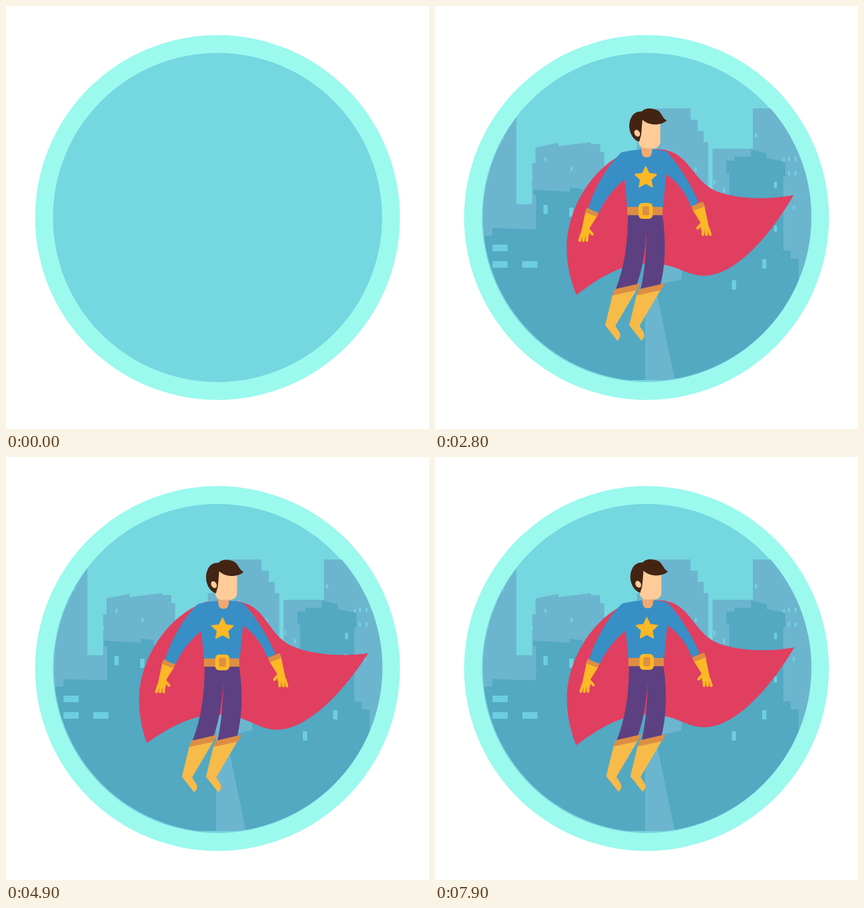
Animation of 640 by 640 pixels, one loop 8000 ms. Source, as an HTML page with a canvas:

```html
<!DOCTYPE html>
<html lang="en">
<head>
<meta charset="utf-8">
<title>Flying hero</title>
<style>
html, body { margin: 0; width: 100%; height: 100%; overflow: hidden; background: #fff; }
canvas { display: block; width: 640px; height: 640px; }
</style>
</head>
<body>
<canvas id="stage" width="640" height="640"></canvas>
<script>
const SIZE = 640, LOOP = 8000, STEP = 100;
const stage = document.getElementById('stage').getContext('2d');
const makeLayer = () => {
  const c = document.createElement('canvas');
  c.width = c.height = SIZE;
  return c.getContext('2d');
};
const heroLayer = makeLayer();

const C = {
  ring: '#9bf9ee', sky: '#75d7df', far: '#6cb5cf', near: '#53a8c2',
  farLight: '#75cfe3', nearLight: '#6ccfe0',
  cape: '#e03f60', suit: '#388fc6', legs: '#5d4082', gold: '#fdb825',
  trim: '#dd8e44', boot: '#f6bb49', skin: '#ffcc99', neck: '#f2a970', hair: '#432413'
};

const clamp = v => Math.min(1, Math.max(0, v));
const ramp = (t, from, to) => clamp((t - from) / (to - from));
const smooth = p => p * p * (3 - 2 * p);
const rad = deg => deg * Math.PI / 180;

function fill(g, color, d) {
  g.fillStyle = color;
  g.fill(new Path2D(d));
}
function disc(g, color, r) {
  g.fillStyle = color;
  g.beginPath();
  g.arc(320, 320, r, 0, 7);
  g.fill();
}
function box(g, color, x, y, w, h, r = 0) {
  g.fillStyle = color;
  g.beginPath();
  g.roundRect(x, y, w, h, r);
  g.fill();
}

function seeded(seed) {
  return () => (seed = seed * 16807 % 2147483647) / 2147483647;
}

// City
function cityLayer(outline, paint) {
  const g = makeLayer();
  g.beginPath();
  g.arc(321, 319, 248.5, 0, 7);
  g.clip();
  g.clip(outline);
  paint(g);
  return g.canvas;
}

const farShape = new Path2D('M60 100H123V300H147V238H152V214L187 207V212L236 206V209H250V221H256V290H287V305H420V216H481V155H580V566H60Z');
for (let i = 0; i < 4; i++) {
  const half = 54 - 6 * i - i * i;
  farShape.rect(359.5 - half, 206 - 17 * i, 2 * half, 128);
}
const nearShape = new Path2D('M60 349L87 347V336L153 338V286H148L149 278L204 281V275L224 277L223 284L258 288V296H254V350H318V566H60Z' +
  'M363 566L333 422L373 414V360L445 362V253H441V234H453V228H478V217L502 223V230L530 236V258H527V370H538V382H550V566Z');

const farCity = cityLayer(farShape, g => {
  box(g, C.far, 0, 0, SIZE, SIZE);
  const rand = seeded(11);
  for (let x = 78; x < 560; x += 21) box(g, C.farLight, x + 8 * rand(), 190 + 140 * rand(), 3, 6.5);
  for (const x of [534, 544]) for (const y of [228, 250]) box(g, C.farLight, x, y, 3, 6.5);
});

const nearCity = cityLayer(nearShape, g => {
  box(g, C.near, 0, 0, SIZE, SIZE);
  const pair = (x, y, dx, dy, w, h) => {
    for (let i = 0; i < 2; i++) box(g, C.nearLight, x + i * dx, y + i * dy, w, h);
  };
  pair(87, 361, 0, 25, 23, 10);
  pair(109, 386, 23, 0, 23 * 0, 10);
  box(g, C.nearLight, 132, 386, 23, 10);
  pair(164, 301, 39, 4, 6.5, 14);
  pair(486, 298, 26, 0, 4.5, 9);
  pair(513, 266, 0, 66, 4.5, 9.5);
  pair(457, 348, 18, 1, 5, 9);
  pair(387, 378, 18, 2, 7, 14);
  pair(495, 383, -46, 32, 6.5, 14);
});

function drawCity(t) {
  const p = ramp(t, 300, 1000);
  if (!p) return;
  stage.globalAlpha = p;
  stage.drawImage(farCity, 0, 0);
  stage.drawImage(nearCity, 0, 32 * (1 - p) ** 2);
  stage.globalAlpha = 1;
}

// Value at time t between turning points [time, value]
function track(t, ease, ...turns) {
  let value = turns[0][1];
  for (let i = 1; i < turns.length; i++) {
    const [t0, v0] = turns[i - 1], [t1, v1] = turns[i];
    if (t >= t0) value = v0 + (v1 - v0) * ease(ramp(t, t0, t1));
  }
  return value;
}
const driftX = t => track(t, p => p, [1500, 313.5], [5000, 328], [7900, 320.5]);
const bobY = t => track(t, smooth, [1300, 314], [2700, 310], [4100, 313.3], [6600, 302.3], [8600, 313]);
const capeAngle = t => track(t, smooth, [1800, 0], [4700, 3.7], [6500, 0.8], [8600, 1.8]);

// Hero, drawn with the belt centre at 315,312
function drawCape(g, angle) {
  g.save();
  g.translate(315, 222);
  g.rotate(rad(angle));
  g.translate(-315, -222);
  fill(g, C.cape, 'M214 441C250 412 285 391 325 391C365 391 378 408.500 406 408.500C450 408 500 355 540 284' +
    'C505 292 455 292 425 281C385 266 382 220 335 218L290 222C235 245 198 310 198 368C198 395 205 420 214 441Z');
  g.restore();
}

function drawLegs(g) {
  fill(g, C.legs, 'M288 317C288 360 283 397 269 432L301 425C310 400 314 375 316 343C316 375 313 405 307 432' +
    'L337 425C345 393 346 355 340 317Z');
  for (const x of [0, 36.5]) {
    g.save();
    g.translate(x, 0);
    fill(g, C.boot, 'M265 438L302 430L269 486L276 497Q278 504 272 508.500L253.500 485Z');
    fill(g, C.trim, 'M268 430.500L307.500 421.500L301.500 432L264.500 440Z');
    g.restore();
  }
}

function drawGlove(g) {
  fill(g, C.gold, 'M224 312L242 319L230 338L229 350H216L219 336Z');
  g.strokeStyle = C.gold;
  g.lineWidth = 4.2;
  g.lineCap = 'round';
  g.beginPath();
  for (let i = 0; i < 3; i++) {
    g.moveTo(218 + 4 * i, 347);
    g.lineTo(215 + 5.5 * i, 356.8);
  }
  g.moveTo(227, 339);
  g.lineTo(234, 347);
  g.stroke();
  fill(g, C.trim, 'M226 307L244 314L240.500 321L223 314Z');
}

function drawGloves(g) {
  drawGlove(g);
  g.save();
  g.translate(627.5, -9);
  g.scale(-1, 1);
  drawGlove(g);
  g.restore();
}

function drawTorso(g) {
  fill(g, C.suit, 'M278 223.500Q292 220 307 219H324Q336 219 346 222C364 240 384 273 395 299Q390 303 383 305' +
    'C376 285 363 268 346 256.500L341 307H287L283 264.500C268 276 252 296 244 315Q236 313 228 308' +
    'C238 276 257 243 278 223.500Z');
  box(g, C.trim, 287, 306, 53.5, 12.5);
  box(g, C.gold, 304, 300, 21.5, 24, 6);
  box(g, C.trim, 310, 305, 10, 13.5, 2);
}

function drawHead(g) {
  fill(g, C.neck, 'M308.500 205H324.500V222Q324 231 316.500 231Q309 231 308.500 222Z');
  box(g, C.skin, 304, 168, 33, 49.5, [0, 3, 10, 10]);
  fill(g, C.hair, 'M347 175C339 183 320 184 310 174L308 197L305 207.500C292 203 287 185 292 173C295 165 301 161 309 161.500' +
    'C313 156 325 155 334 160.500C339 164 341 173 347 175Z');
  g.fillStyle = C.skin;
  g.beginPath();
  g.ellipse(302, 194.5, 4, 5.5, -0.5, 0, 7);
  g.fill();
}

function drawStar(g, size) {
  if (!size) return;
  g.save();
  g.translate(315, 262);
  g.scale(size, size);
  g.beginPath();
  for (let i = 0; i < 10; i++) {
    const r = i % 2 ? 8.3 : 17, a = rad(i * 36 - 90);
    g.lineTo(r * Math.cos(a), r * Math.sin(a));
  }
  g.closePath();
  g.fillStyle = g.strokeStyle = C.gold;
  g.lineWidth = 1.6;
  g.lineJoin = 'round';
  g.fill();
  g.stroke();
  g.restore();
}

function drawHero(t) {
  const p = ramp(t, 450, 1490);
  if (!p) return;
  const e = smooth(p), rest = 1 - e, g = heroLayer;
  g.clearRect(0, 0, SIZE, SIZE);
  g.save();
  g.translate(driftX(t) - 18 * rest, bobY(t) + 145 * rest);
  g.rotate(rad(38 * rest));
  g.scale(e, e);
  g.translate(-315, -312);
  drawCape(g, capeAngle(t) + 10 * rest);
  drawLegs(g);
  drawGloves(g);
  drawTorso(g);
  drawHead(g);
  drawStar(g, smooth(ramp(t, 2100, 2600)));
  g.restore();
  stage.globalAlpha = p;
  stage.drawImage(g.canvas, 0, 0);
  stage.globalAlpha = 1;
}

function draw(now) {
  const t = Math.floor(now % LOOP / STEP) * STEP;
  stage.fillStyle = '#fff';
  stage.fillRect(0, 0, SIZE, SIZE);
  disc(stage, C.ring, 276);
  disc(stage, C.sky, 249);
  drawCity(t);
  drawHero(t);
}

let start;
function tick(now) {
  start ??= now;
  draw(Math.max(0, now - start));
  requestAnimationFrame(tick);
}
draw(0);
requestAnimationFrame(tick);
</script>
</body>
</html>
```
